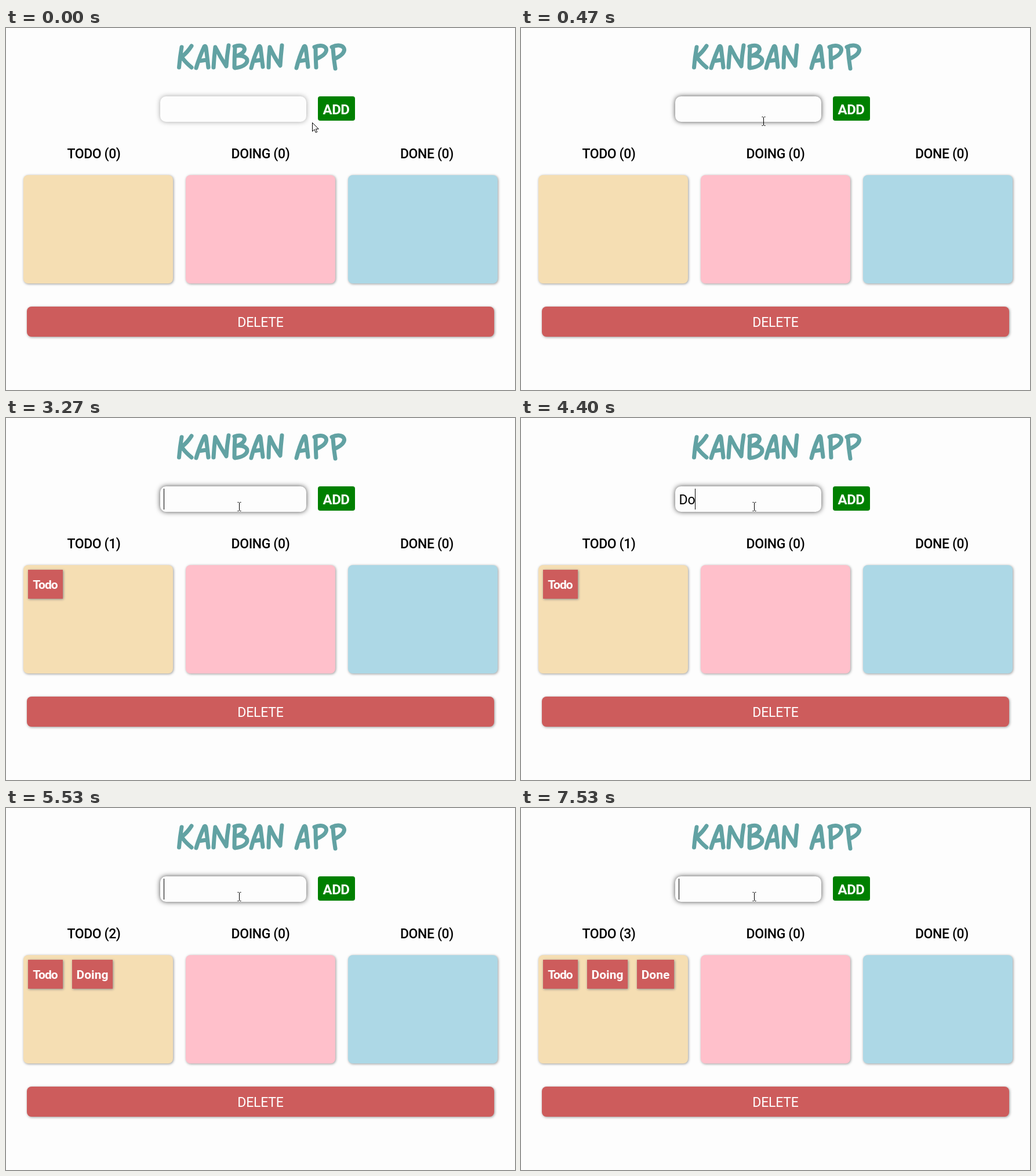
An HTML page for the animation above (8 s loop, 878 by 625 pixels).

```html
<!DOCTYPE html>
<html lang="en">
<head>
<meta charset="utf-8">
<title>Kanban App</title>
<style>
  html, body { margin: 0; width: 100%; height: 100%; overflow: hidden; background: #fdfdfd; }
  #stage { position: relative; width: 878px; height: 625px; overflow: hidden; }
  #stage div, svg { position: absolute; }
  svg { left: 0; top: 0; }
  h1 { position: absolute; left: 294px; top: 26px; margin: 0; color: transparent; font: 700 40px/48px Roboto, sans-serif; }
  #field { left: 266px; top: 118px; width: 252px; height: 44px; border-radius: 10px; background: #fdfdfd; }
  #add { left: 538px; top: 118px; width: 64px; height: 42px; border-radius: 4px; background: green; }
  .column { top: 254px; width: 258px; height: 187px; border-radius: 8px; box-shadow: 1px 1px 4px #999; }
  #delete { left: 36px; top: 481px; width: 806px; height: 52px; border-radius: 8px; background: indianred; box-shadow: 1px 1px 4px #999; }
  .tile { top: 262px; height: 50px; background: indianred; box-shadow: 1px 1px 4px #888; }
  text { font: 400 23px Roboto, "Open Sans", sans-serif; text-anchor: middle; }
  .head { font-weight: 500; letter-spacing: -.4px; }
  .bold { font-weight: 700; fill: #fff; }
  #typed { text-anchor: start; }
  #title { fill: none; stroke: #62a2a3; stroke-width: 7; stroke-linecap: round; stroke-linejoin: round; }
</style>
</head>
<body>
<div id="stage">
  <h1>KANBAN APP</h1>
  <div id="field"></div>
  <div id="add"></div>
  <div class="column" style="left:30px;background:wheat"></div>
  <div class="column" style="left:310px;background:pink"></div>
  <div class="column" style="left:590px;background:lightblue"></div>
  <div id="delete"></div>
  <div class="tile" style="left:38px;width:60px"></div>
  <div class="tile" style="left:114px;width:70px"></div>
  <div class="tile" style="left:200px;width:64px"></div>
  <svg width="878" height="625" viewBox="0 0 878 625">
    <g id="title" aria-hidden="true">
      <path d="M303 33Q300 50 298.500 68M320 31Q313 42 303 50Q310 60 320 68"/>
      <path d="M328 69Q334 49 342 32Q344 30 345 34Q347 50 349 68M333 57L346 55"/>
      <path d="M358 68Q359 50 361 33Q370 51 380 66Q381 48 384 30"/>
      <path d="M395 33Q394 50 394 68M394 32C411 25 421 40 398 48C424 46 421 67 395 69"/>
      <path d="M423 69Q428 49 436 32Q438 30 439 34Q441 50 443 67M427 57L441 55"/>
      <path d="M453 68Q453 50 455 33Q463 51 473 65Q474 48 476 30"/>
      <path d="M501 69Q506 49 514 32Q516 30 517 34Q519 50 521 67M506 57L519 55"/>
      <path d="M534 35Q534 52 535 68M532 33C551 24 565 41 536 53"/>
      <path d="M564 35Q565 52 568 70M562 33C582 23 596 41 567 53"/>
    </g>
    <text class="head" id="count" x="151.500" y="225">TODO (0)</text>
    <text class="head" x="439" y="225">DOING (0)</text>
    <text class="head" x="726" y="225">DONE (0)</text>
    <text class="bold" x="569.500" y="149" style="font-size:24px;letter-spacing:-.5px">ADD</text>
    <text x="439" y="516" style="fill:#fff;letter-spacing:-.2px">DELETE</text>
    <g class="labels">
      <text class="bold" x="67.500" y="295" style="font-size:21px;letter-spacing:-1px">Todo</text>
      <text class="bold" x="149" y="295" style="font-size:21px">Doing</text>
      <text class="bold" x="232" y="295" style="font-size:21px">Done</text>
    </g>
    <text id="typed" x="272.500" y="149"></text>
    <rect id="caret" x="272" y="122" width="1" height="36"/>
    <path id="arrow" d="M.5 .5V15.500L4 12.200L6.300 17.500L8.700 16.500L6.400 11.300H11.200Z" fill="#fff" stroke="#000"/>
    <path id="beam" d="M-2.500 -7.500H-.5M1.500 -7.500H3.500M.5 -7V7M-2.500 7.500H-.5M1.500 7.500H3.500" fill="none" stroke="#000"/>
  </svg>
</div>
<script>
  const $ = id => document.getElementById(id);
  const LOOP = 8000, STEP = 1000 / 15, BLINK = 8, FOCUS = 11;

  // Times are in steps of 1/15 s.
  const tasks = [
    { word: 'Todo', keys: [25, 30, 32, 35], add: 49, spacing: -1.3 },
    { word: 'Doing', keys: [61, 66, 69, 73, 76], add: 83, spacing: 0 },
    { word: 'Done', keys: [95, 100, 103, 106], add: 113, spacing: 0 }
  ];
  const resets = [FOCUS, ...tasks.flatMap(task => [...task.keys, task.add])];
  const tiles = document.querySelectorAll('.tile');
  const labels = document.querySelectorAll('.labels text');
  const typed = $('typed'), caret = $('caret'), arrow = $('arrow'), beam = $('beam');
  const clamp = v => Math.max(0, Math.min(1, v));
  const show = (el, on) => { el.style.visibility = on ? 'visible' : 'hidden'; };

  function drawPointer(n) {
    const u = clamp(n / FOCUS);
    const x = Math.floor(402 + 126 * (1 - u) ** 2);
    const y = Math.round(163 - 10 * u ** 3.5);
    const inside = x < 519;
    show(arrow, !inside);
    show(beam, inside);
    (inside ? beam : arrow).setAttribute('transform', `translate(${x} ${y})`);
    const shade = Math.round(165 - 90 * clamp((n - 1) / 5));
    $('field').style.boxShadow = `0 0 8px rgb(${shade},${shade},${shade})`;
  }

  function drawTasks(n) {
    const added = tasks.filter(task => n >= task.add).length;
    $('count').textContent = `TODO (${added})`;
    tasks.forEach((task, i) => {
      show(tiles[i], i < added);
      show(labels[i], i < added);
    });
    const task = tasks[added];
    const length = task ? task.keys.filter(k => n >= k).length : 0;
    typed.textContent = task ? task.word.slice(0, length) : '';
    typed.style.letterSpacing = (task ? task.spacing : 0) + 'px';
    const width = length ? typed.getComputedTextLength() : 0;
    caret.setAttribute('x', Math.floor(272 + width));
    const last = Math.max(...resets.filter(r => r <= n));
    show(caret, n >= FOCUS && Math.floor((n - last) / BLINK) % 2 === 0);
  }

  function draw(ms) {
    const n = Math.floor((ms % LOOP + 4) / STEP) % 120;
    drawPointer(n);
    drawTasks(n);
  }

  const start = performance.now();
  function tick() {
    draw(performance.now() - start);
    requestAnimationFrame(tick);
  }
  tick();
</script>
</body>
</html>
```
